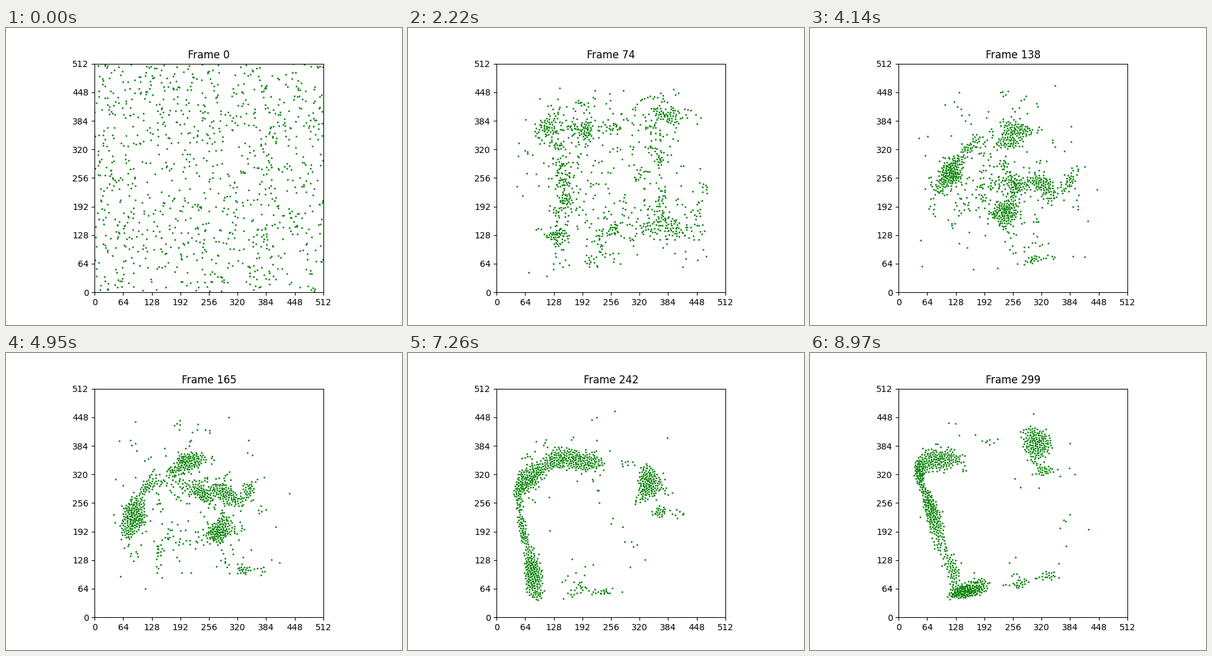
Recreate the animation shown at these times as a matplotlib script. Size 640 px wide and 480 px high, loop 9000 ms.

```python
import numpy as np
import matplotlib.pyplot as plt
from matplotlib.animation import FuncAnimation

SIZE, COUNT, FRAMES = 512, 1000, 300
MARGIN = 64
CRUISE, TOP_SPEED = 1.9, 3.0
SIGHT, PERSONAL = 22, 5


def length(v):
    return np.linalg.norm(v, axis=1, keepdims=True) + 1e-9


def flocking(pos, vel, social):
    """Separation, alignment and cohesion."""
    sq = (pos ** 2).sum(1)
    dist2 = sq[:, None] + sq - 2 * pos @ pos.T
    near = (dist2 < SIGHT ** 2).astype(float)
    close = (dist2 < PERSONAL ** 2).astype(float)
    n = near.sum(1, keepdims=True)
    cohesion = near @ pos / n - pos
    alignment = near @ vel / n - vel
    separation = close.sum(1, keepdims=True) * pos - close @ pos
    return social * (0.004 * cohesion + 0.08 * alignment) + 0.02 * separation


def swirl(pos, vel, step):
    """Slow counterclockwise drift that spirals towards a moving centre."""
    keys = [0, 111, 199, 299]
    centre = np.array([np.interp(step, keys, [256, 170, 160, 235]),
                       np.interp(step, keys, [256, 170, 190, 190])])
    out = pos - centre
    r = length(out)
    out = out / r
    around = np.column_stack([-out[:, 1], out[:, 0]])
    pull = np.clip((r - 60) / 150, 0, 1)
    wish = CRUISE * (0.7 * around - 0.6 * pull * out)
    return 0.014 * min(1, step / 80) * (wish - vel)


def simulate(seed=12):
    rng = np.random.default_rng(seed)
    pos = rng.uniform(0, SIZE, (COUNT, 2))
    angle = rng.uniform(0, 2 * np.pi, COUNT)
    vel = CRUISE * np.column_stack([np.cos(angle), np.sin(angle)])
    social = rng.uniform(0.15, 1.2, (COUNT, 1))
    cruise = rng.uniform(0.85, 1.15, (COUNT, 1)) * CRUISE

    history = [pos]
    for step in range(1, FRAMES):
        inward = np.clip(pos, MARGIN, SIZE - MARGIN) - pos
        pace = 0.1 * (cruise / length(vel) - 1) * vel
        wander = rng.normal(0, 0.06, (COUNT, 2))
        vel = (vel + flocking(pos, vel, social) + swirl(pos, vel, step)
               + pace + wander + 0.006 * inward)
        vel = vel * np.minimum(1, TOP_SPEED / length(vel))
        pos = pos + vel
        history.append(pos)
    return history


history = simulate()

fig, ax = plt.subplots(figsize=(6.4, 4.8), dpi=100)
ax.set_aspect("equal")
ax.set(xlim=(0, SIZE), ylim=(0, SIZE))
ax.set_xticks(range(0, SIZE + 1, 64))
ax.set_yticks(range(0, SIZE + 1, 64))
dots, = ax.plot([], [], "o", color="green", markersize=1)
title = ax.set_title("Frame 0")


def draw(i):
    dots.set_data(history[i][:, 0], history[i][:, 1])
    title.set_text(f"Frame {i}")
    return dots, title


anim = FuncAnimation(fig, draw, frames=FRAMES, interval=30, repeat=True, repeat_delay=0)
plt.show()
```
